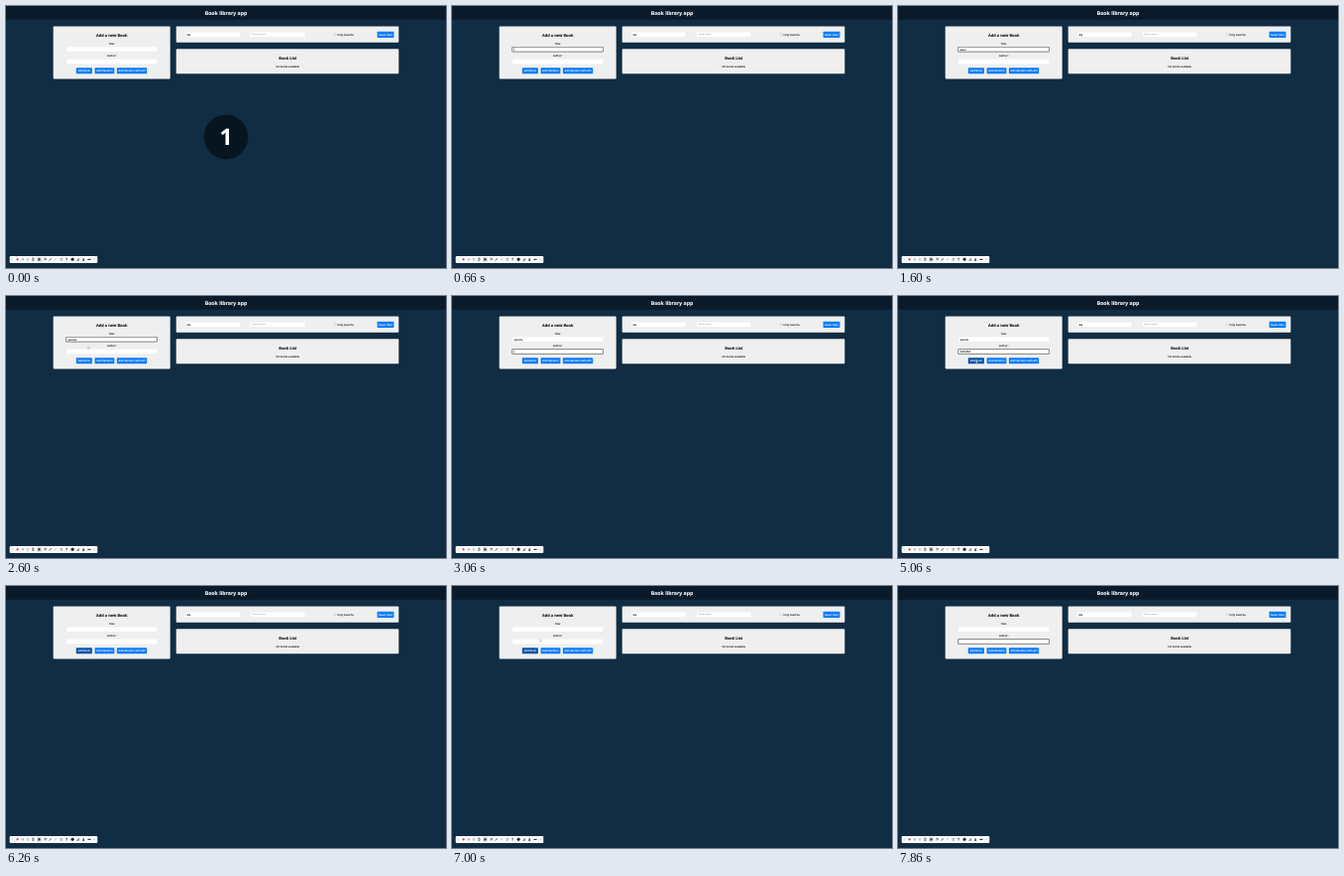
Write an HTML page that moves like this. It is 444 px wide and 264 px high and loops after 8000 ms.

```html
<!DOCTYPE html>
<html lang="en">
<head>
<meta charset="utf-8">
<title>Book library app</title>
<style>
  html, body { margin: 0; width: 100%; height: 100%; overflow: hidden; background: #112d44; }
  svg { display: block; width: 444px; height: 264px; }
  text {
    font: 2.7px "Open Sans", "Noto Sans", sans-serif; fill: #222; stroke: #222; stroke-width: .08px;
    text-rendering: geometricPrecision; white-space: pre;
  }
  .mid { text-anchor: middle; }
  .head { font-size: 3.95px; font-weight: 700; fill: #111; }
  .white { fill: #fff; stroke: #fff; }
  .hint { font-size: 1.9px; fill: #777; stroke: none; }
  .card { fill: #efefef; }
  .field { fill: #fff; stroke: #e4e4e4; stroke-width: .2px; }
  .btn { fill: #0a7cf7; }
  .ring { fill: none; stroke: #151515; stroke-width: .5px; }
  .caret { fill: #222; }

  .anim, .ring, .caret { animation: 8s step-end infinite; }
  .count { animation-name: count; }
  .title-focus { animation-name: title-focus; }
  .author-focus { animation-name: author-focus; }
  .title-caret { animation-name: title-caret; }
  .author-caret { animation-name: author-caret; }
  .title-text { animation-name: title-text; }
  .author-text { animation-name: author-text; }
  .add { animation: press 8s linear infinite; }
  .cursor { animation: travel 8s ease-in-out infinite, reveal 8s step-end infinite; }

  @keyframes count { 0% { opacity: 1 } 3.25%, 100% { opacity: 0 } }
  @keyframes title-focus { 0% { opacity: 0 } 7% { opacity: 1 } 36.6%, 100% { opacity: 0 } }
  @keyframes author-focus {
    0% { opacity: 0 } 36.6% { opacity: 1 } 65.75% { opacity: 0 } 88.75%, 100% { opacity: 1 }
  }
  @keyframes title-caret { 0% { opacity: 0 } 7% { opacity: 1 } 13.25%, 100% { opacity: 0 } }
  @keyframes author-caret {
    0% { opacity: 0 } 36.6% { opacity: 1 } 42.5% { opacity: 0 } 88.75% { opacity: 1 } 95%, 100% { opacity: 0 }
  }
  @keyframes title-text {
    0% { clip-path: inset(0 100% 0 0) }
    13.25% { clip-path: inset(0 100% 0 0); animation-timing-function: steps(6) }
    21.6% { clip-path: inset(0 0 0 0) }
    68.25%, 100% { clip-path: inset(0 100% 0 0) }
  }
  @keyframes author-text {
    0% { clip-path: inset(0 100% 0 0) }
    41.6% { clip-path: inset(0 100% 0 0); animation-timing-function: steps(9) }
    50.75% { clip-path: inset(0 0 0 0) }
    68.25%, 100% { clip-path: inset(0 100% 0 0) }
  }
  @keyframes press {
    0%, 60.5% { fill: #0a7cf7 } 62.5%, 88.75% { fill: #0754a8 } 91.25%, 100% { fill: #0a7cf7 }
  }
  @keyframes travel {
    0%, 28.25% { transform: translate(92px, 44px) }
    32.5% { transform: translate(82.5px, 50.3px) }
    36.6%, 57.5% { transform: translate(85px, 56px) }
    63.25%, 74.1% { transform: translate(78.6px, 65.3px) }
    78.25%, 85% { transform: translate(90px, 44px) }
    88.75%, 100% { transform: translate(88px, 56px) }
  }
  @keyframes reveal {
    0% { opacity: 0 } 29.5% { opacity: 1 } 34.5% { opacity: 0 }
    59% { opacity: 1 } 77% { opacity: 0 } 86.5% { opacity: 1 } 88%, 100% { opacity: 0 }
  }
</style>
</head>
<body>
<svg viewBox="0 0 444 264">
  <rect width="444" height="264" fill="#112d44"/>
  <rect width="444" height="13.7" fill="#0a1a2b"/>
  <text class="mid white" x="222" y="9.3" style="font-size:5.2px;font-weight:700">Book library app</text>

  <rect class="card" x="47.7" y="20.6" width="118" height="52.8" rx=".8"/>
  <text class="mid head" x="106.7" y="31.2">Add a new Book</text>
  <text class="mid" x="106.7" y="38.8">Title:</text>
  <rect class="field" x="60.9" y="41.3" width="91.6" height="4.8" rx=".4"/>
  <text class="anim title-text" x="62.4" y="44.5">qwerty</text>
  <rect class="ring title-focus" x="60.7" y="41.3" width="91.9" height="4.8" rx=".5"/>
  <rect class="caret title-caret" x="62.2" y="42.2" width=".4" height="2.9"/>
  <text class="mid" x="106.7" y="51.1">Author:</text>
  <rect class="field" x="60.9" y="53.6" width="91.6" height="4.8" rx=".4"/>
  <text class="anim author-text" x="62.4" y="56.9">fsdfsdfsf</text>
  <rect class="ring author-focus" x="60.7" y="53.6" width="91.9" height="4.8" rx=".5"/>
  <rect class="caret author-caret" x="62.2" y="54.6" width=".4" height="2.9"/>

  <rect class="btn add" x="70.8" y="62.2" width="16.1" height="6.1" rx=".6"/>
  <rect class="btn" x="89.6" y="62.2" width="19.8" height="6.1" rx=".6"/>
  <rect class="btn" x="111.9" y="62.2" width="30.3" height="6.1" rx=".6"/>
  <text class="mid white" x="78.9" y="66.2">Add Book</text>
  <text class="mid white" x="99.5" y="66.2">Add Random</text>
  <text class="mid white" x="127" y="66.2">Add Random with API</text>

  <rect class="card" x="171.7" y="20.6" width="224.6" height="16.2" rx=".8"/>
  <rect class="field" x="181" y="26.3" width="55" height="5" rx=".4"/>
  <text x="182.4" y="29.7">dla</text>
  <rect class="field" x="246.7" y="26.3" width="55" height="5" rx=".4"/>
  <text class="hint" x="248.2" y="29.3">Filter by author...</text>
  <rect x="331.2" y="27.8" width="1.8" height="1.8" rx=".3" fill="#fff" stroke="#888" stroke-width=".25"/>
  <text x="334.3" y="29.7">Only Favorite</text>
  <rect class="btn" x="374.6" y="25.7" width="16.8" height="6.2" rx=".6"/>
  <text class="mid white" x="383" y="29.7">Reset Filter</text>

  <rect class="card" x="171.7" y="43.2" width="224.6" height="25" rx=".8"/>
  <text class="mid head" x="284.3" y="54.2">Book List</text>
  <text class="mid" x="284.3" y="61.6">No books available</text>

  <g class="anim count">
    <circle cx="222" cy="132" r="22.4" fill="#071520"/>
    <text class="mid white" x="222" y="140.2" style="font-size:23px;font-weight:700">1</text>
  </g>

  <rect x="3.7" y="252" width="88.6" height="6.9" rx="1" fill="#fbfbfb"/>
  <rect x="31.4" y="253" width="4.4" height="4.6" rx=".6" fill="#cfd3d6"/>
  <g fill="none" stroke="#666" stroke-width=".55">
    <path d="M6.3 254.2v2.2" stroke="#bbb"/>
    <path d="M16.2 254.4v1.9m1.3-1.9v1.9"/>
    <circle cx="22" cy="255.3" r="1.1" stroke="#999"/>
    <path d="M26.6 254.6h1.5v1.9h-1.5zM26.3 254h2.1" stroke="#444"/>
    <path d="M32.9 254l1.7 1.6-1 .2-.7.8z" fill="#222" stroke="#222"/>
    <path d="M38.3 256.4l2-2.1m-2 0h2v2.1" stroke="#333"/>
    <path d="M43.8 256.5l2-2.2" stroke="#333" stroke-width=".9"/>
    <path d="M49 256.3l2-2"/>
    <rect x="55" y="254.4" width="1.8" height="1.8" stroke="#888"/>
    <path d="M60.2 254.3h2m-1 0v2.3" stroke="#222"/>
    <circle cx="67.1" cy="255.3" r="1.3" fill="#222" stroke="#111"/>
    <path d="M71.7 256.4l1.9-2v2z" stroke="#333"/>
    <path d="M77.4 256.5l.8-2.2.8 2.2z" fill="#333" stroke="#333"/>
    <path d="M82.4 255.4h3.2" stroke="#333" stroke-width="1.1"/>
    <path d="M88.2 255l.7.7.7-.7" stroke="#777"/>
  </g>
  <circle cx="11.6" cy="255.3" r="1.1" fill="#d8324a"/>

  <path class="cursor" d="M0 0v2.7l.7-.5.5 1 .5-.2-.5-1h.8z" fill="#fff" stroke="#444" stroke-width=".2"/>
</svg>
</body>
</html>
```
